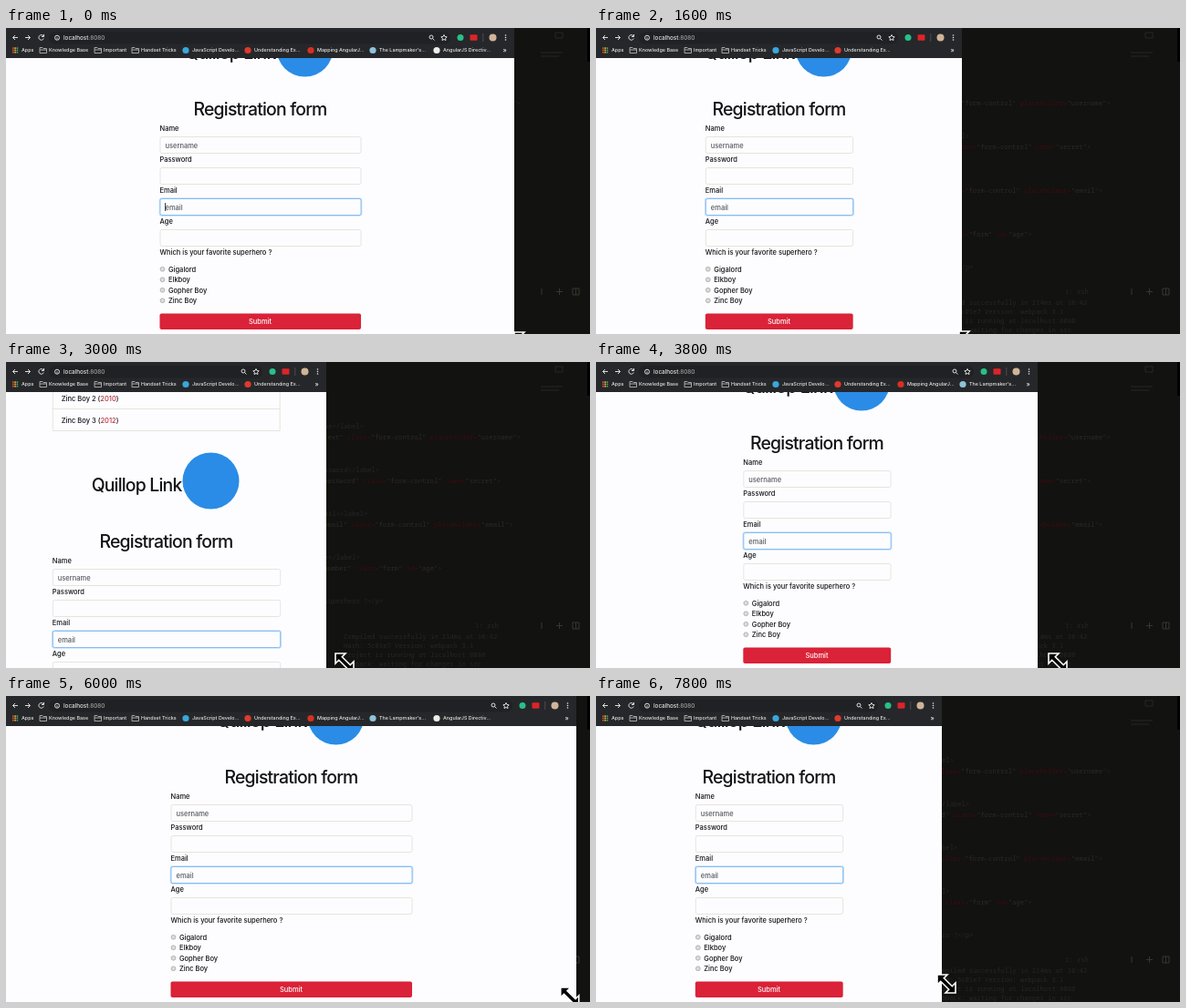
Animation, 640 px wide and 336 px high, one loop 8000 ms. Source, as an HTML page:

```html
<!DOCTYPE html>
<html lang="en">
<head>
<meta charset="utf-8">
<title>Responsive form</title>
<style>
  html, body { margin: 0; width: 100%; height: 100%; overflow: hidden; background: #121210; }
  svg { display: block; width: 100vw; height: 100vh; font: 450 7.5px Inter, sans-serif; fill: #121316; }
  .code { font: 7.2px "Noto Sans Mono", monospace; fill: #262624; }
  .attr { fill: #3c0c12; }
  .value { fill: #2e2a24; }
  .title { font-size: 19.4px; font-weight: 550; letter-spacing: -.8px; }
  .hint { fill: #55585c; }
  .box { fill: #fdfdff; stroke: #e4e6dc; }
  .focus { stroke: #86bdf4; }
  .chrome { font-size: 5.4px; fill: #e6e6e4; }
  .line { fill: none; stroke: #dededc; stroke-width: 1; }
</style>
</head>
<body>
<svg id="stage" viewBox="0 0 640 336"></svg>
<script>
const LOOP = 8000, STEP = 200, SCALE = 0.489, STACK_SHIFT = 108;

// time, window width, pointer x, pointer y
const KEYS = [
  [0, 557, 567, 344], [1600, 401, 408, 343], [2400, 340, 341, 333],
  [3000, 351, 371, 330], [3800, 484, 506, 330], [4800, 617, 628, 330],
  [5400, 632, 637, 330], [6200, 617, 606, 330], [7000, 551, 530, 330],
  [7800, 379, 384, 316]
];

// label, text start, text end, icon colour (none: folder)
const BOOKMARKS = [
  ["Knowledge Base", 47, 89], ["Important", 107, 132], ["Handset Tricks", 148, 186],
  ["JavaScript Develo...", 204, 253, "#38a8dc"],
  ["Understanding Ex...", 272, 321, "#e03a2c"],
  ["Mapping AngularJ...", 341, 392, "#d83020"],
  ["The Lampmaker's...", 409, 455, "#8cc4d8"],
  ["AngularJS Directiv...", 479, 529, "#ecece8"]
];
const FIELDS = [["Name", "username"], ["Password", ""], ["Email", "email"], ["Age", ""]];
const HEROES = ["Gigalord", "Elkboy", "Gopher Boy", "Zinc Boy"];
const INPUTS = [
  '<input type="text" class="form-control" placeholder="username">',
  '<input type="password" class="form-control" name="secret">',
  '<input type="email" class="form-control" placeholder="email">',
  '<input type="number" class="form" id="age">'
];
const TERMINAL = [
  "Compiled successfully in 214ms at 10:42",
  "Hash: 5c01e7 Version: webpack 3.1",
  "Project is running at localhost:8080",
  "webpack: waiting for changes in src"
];

const text = (x, y, content, attrs = "") => `<text x="${x}" y="${y}" ${attrs}>${content}</text>`;
const rect = (x, y, w, h, attrs = "") => `<rect x="${x}" y="${y}" width="${w}" height="${h}" ${attrs}/>`;
const circle = (x, y, r, attrs = "") => `<circle cx="${x}" cy="${y}" r="${r}" ${attrs}/>`;
const path = (d, attrs = 'class="line"') => `<path d="${d}" ${attrs}/>`;

const paintCode = source => source.replace(/</g, "&lt;").replace(/>/g, "&gt;")
  .replace(/(\w+)=("[^"]*")/g, (_, name, value) =>
    `<tspan class="attr">${name}=</tspan><tspan class="value">${value}</tspan>`);

function editor() {
  const lines = INPUTS.map((source, i) => {
    const y = 73 + i * 48;
    return text(310, y, paintCode(`<label>${FIELDS[i][0]}</label>`)) +
      text(292, y + 11.5, paintCode(source));
  });
  return `<g class="code">
    ${rect(0, 0, 640, 336, 'fill="#121210"')}
    ${rect(637, 0, 3, 37, 'fill="#000"')}
    ${path("M602 5h8v6h-8zM586 27h24M586 31h20", 'fill="none" stroke="#262624"')}
    ${lines.join("")}
    ${text(310, 265, paintCode("<p>Which superhero ?</p>"))}
    ${text(514, 292, "1: zsh")}
    ${path("M587 286v7M603 289.500h7M606.500 286v7M621 286h7v7h-7zM624.500 286v7", 'fill="none" stroke="#363632"')}
    ${TERMINAL.map((row, i) => text(370, 304 + i * 10, row)).join("")}
  </g>`;
}

function form(width) {
  const fields = FIELDS.map(([label, hint], i) => {
    const y = 112.7 + i * 34, focused = label === "Email";
    return text(0, y, label) +
      (focused ? rect(-.8, y + 5.5, width + 2.6, 20.6, 'rx="3" fill="#c4dffa"') : "") +
      rect(.5, y + 6.8, width, 18, `rx="2" class="box ${focused ? "focus" : ""}"`) +
      text(6, y + 18.8, hint, 'class="hint"');
  });
  const options = HEROES.map((hero, i) => {
    const y = 267.7 + i * 11.5;
    return circle(3, y - 2.9, 2.4, 'fill="#dcdcda" stroke="#a6a6a4" stroke-width=".8"') + text(9.5, y, hero);
  });
  return fields.join("") + text(0, 248.5, "Which is your favorite superhero ?") + options.join("") +
    rect(0, 313.5, width + .5, 17.5, 'rx="2" fill="#da2238"') +
    text(width / 2, 325.2, "Submit", 'text-anchor="middle" fill="#fff"');
}

function films(width) {
  const row = (y, part, year) =>
    text(10, y, `Zinc Boy ${part} (<tspan fill="#b42c34">${year}</tspan>)`);
  return path(`M.5 -90V-32.500H${width}V-90M0 -56.500H${width}`, 'fill="none" stroke="#e4e6dc"') +
    row(-65.3, 2, 2010) + row(-41.5, 3, 2012);
}

function containerWidth(windowWidth) {
  const viewport = windowWidth / SCALE;
  const column = viewport >= 1200 ? 540 : viewport >= 992 ? 450 : viewport >= 768 ? 330 : 510;
  return { width: column * SCALE, stacked: viewport < 768 };
}

function page(windowWidth, caret) {
  const { width, stacked } = containerWidth(windowWidth), middle = windowWidth / 2;
  return rect(0, 0, windowWidth, 336, 'fill="#fdfdff"') +
    `<g transform="translate(${middle} ${stacked ? STACK_SHIFT : 0})">
      ${text(17, 33.7, "Quillop Link", 'class="title" text-anchor="end"')}
      ${circle(49, 22.5, 31, 'fill="#2a8ce6"')}
      ${text(0, 96, "Registration form", 'class="title" text-anchor="middle"')}
      <g transform="translate(${-width / 2})">
        ${films(width)}${form(width)}
        ${caret ? rect(5.6, 192, .8, 9) : ""}
      </g>
    </g>`;
}

function bookmarks(windowWidth) {
  const colors = ["#e05030", "#e8c040", "#50a860"];
  let out = text(17, 26.4, "Apps");
  for (let i = 0; i < 9; i++) {
    out += rect(7 + i % 3 * 2.3, 21.3 + Math.floor(i / 3) * 2.3, 1.6, 1.6, `fill="${colors[i % 3]}"`);
  }
  for (const [label, start, end, color] of BOOKMARKS) {
    if (end > windowWidth - 20) break;
    out += text(start, 26.4, label) + (color
      ? circle(start - 7, 24.5, 3.6, `fill="${color}"`)
      : path(`M${start - 10} 27.500v-6h3l1 1h3.500v5zm0-3.500h7.500`, 'fill="none" stroke="#b4b4b2" stroke-width=".9"'));
  }
  return out + text(windowWidth - 12.5, 26.6, "»", 'font-size="7"');
}

function toolbar(windowWidth) {
  const dots = [8, 10.5, 13].map(y => circle(-9.5, y, .8)).join("");
  return `<g class="chrome">
    ${rect(0, 0, windowWidth, 33, 'fill="#26272a"')}
    ${rect(47, 4, windowWidth - 117, 13.5, 'rx="6.700" fill="#202124"')}
    ${path("M13 10.500H7.500M10 8L7.500 10.500L10 13M21 10.500h5.500M24 8l2.500 2.500L24 13")}
    ${path("M41 8.800A2.800 2.800 0 1 0 41.300 11.500M41.500 7v2.500H39")}
    ${circle(56, 10.7, 2.5, 'class="line" stroke-width=".8"')}${rect(55.6, 10.2, .8, 2)}
    ${text(63, 12.7, 'localhost<tspan fill="#a0a09e">:8080</tspan>', 'style="font-size:6.300px"')}
    <g transform="translate(${windowWidth})">
      ${circle(-91, 10, 2, 'class="line"')}${path("M-89.500 11.500l2 2")}
      ${path("M-77 7.500l1 2 2.200.3-1.600 1.500.4 2.200-2-1-2 1 .4-2.200-1.600-1.500 2.200-.3z")}
      ${circle(-59, 10.5, 3.5, 'fill="#28c088"')}
      ${rect(-48.5, 7.3, 8, 6.5, 'rx="1" fill="#dc2428"')}
      ${rect(-34.5, 6, .7, 9, 'fill="#5c5c5a"')}
      ${circle(-23.5, 10.5, 4, 'fill="#d0b498"')}
      ${dots}
    </g>
    ${bookmarks(windowWidth)}
  </g>`;
}

const pointer = (x, y) => `<path transform="translate(${x} ${y})" fill="#000" stroke="#fff" stroke-width="1.6"
  d="M-10-10H1L-2.700-6.300L6.300 2.700L10-1V10H-1L2.700 6.300L-6.300-2.700L-10 1Z"/>`;

// Smooth curve through the keys
function sample(time, column) {
  const last = KEYS.length - 1;
  const next = KEYS.findIndex(key => key[0] > time);
  const i = next < 0 ? last - 1 : next - 1;
  const slope = k => {
    const a = KEYS[Math.max(k - 1, 0)], b = KEYS[Math.min(k + 1, last)];
    return (b[column] - a[column]) / (b[0] - a[0]);
  };
  const [from, to] = [KEYS[i], KEYS[i + 1]];
  const span = to[0] - from[0], u = Math.min((time - from[0]) / span, 1), v = 1 - u;
  return from[column] * v * v * (1 + 2 * u) + to[column] * u * u * (3 - 2 * u) +
    span * u * v * (slope(i) * v - slope(i + 1) * u);
}

const stage = document.getElementById("stage");
stage.innerHTML = editor() + '<g id="window"></g>';
const windowLayer = document.getElementById("window");
let shown = -1;

function draw(now) {
  const time = Math.floor(now % LOOP / STEP) * STEP;
  if (time !== shown) {
    shown = time;
    const width = Math.round(sample(time, 1));
    windowLayer.innerHTML = page(width, time < 400) + toolbar(width) +
      pointer(sample(time, 2), sample(time, 3));
  }
  requestAnimationFrame(() => draw(performance.now()));
}
draw(0);
</script>
</body>
</html>
```
